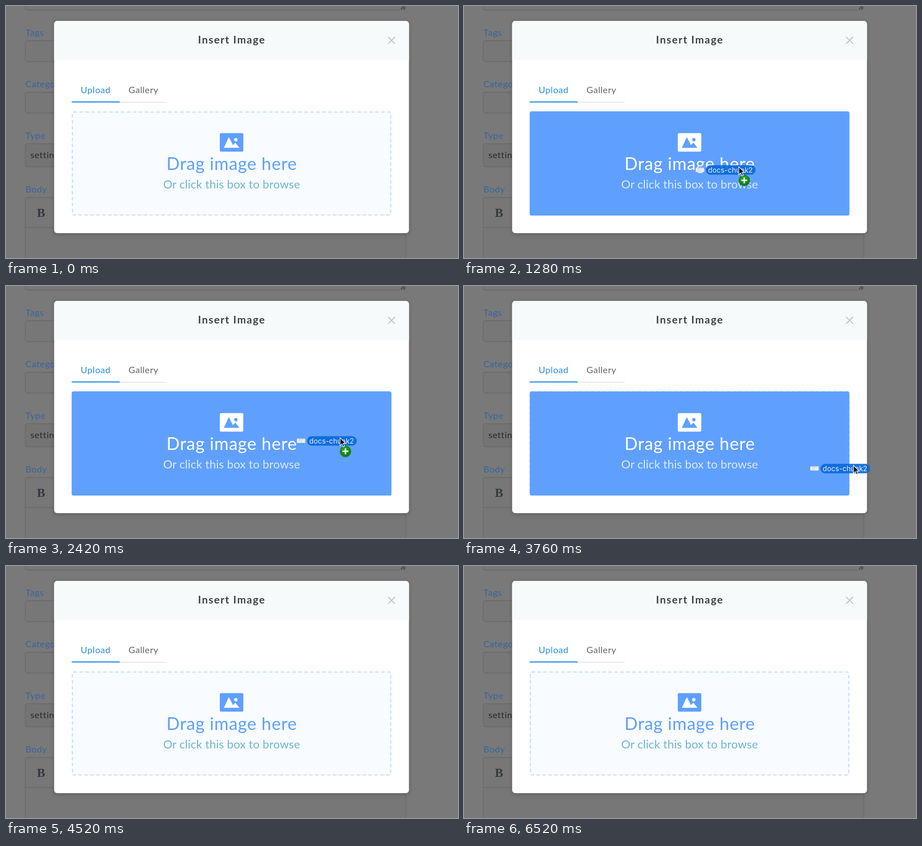
These frames come from a looping animation (1000x558 px, 6540 ms). An HTML page:

```html
<!DOCTYPE html>
<html lang="en">
<head>
<meta charset="utf-8">
<title>Insert Image</title>
<style>
html, body { margin: 0; width: 100%; height: 100%; overflow: hidden; background: #797979; }
svg { display: block; width: 100vw; height: 100vh; }
text { font: 20px Lato, "Open Sans", sans-serif; letter-spacing: .6px; }
.label { fill: #38669b; }
.field { fill: #777; stroke: #686868; stroke-width: 1.3; }
.mid { text-anchor: middle; }
#modal { filter: drop-shadow(0 2px 5px rgba(0, 0, 0, .22)); }
</style>
</head>
<body>
<svg viewBox="0 0 1000 558">
  <defs>
    <radialGradient id="green" cx=".45" cy=".35" r=".7">
      <stop offset="0" stop-color="#32ac26"/>
      <stop offset="1" stop-color="#087510"/>
    </radialGradient>
  </defs>

  <!-- dimmed form -->
  <rect width="1000" height="558" fill="#797979"/>
  <rect class="field" x="42.5" y="-40" width="842" height="49" rx="5"/>
  <path d="M874 7l8-8M879 7l4-4" stroke="#333" stroke-width="1.6"/>
  <text class="label" x="43" y="66">Tags</text>
  <rect class="field" x="42.5" y="77" width="842" height="46" rx="5"/>
  <text class="label" x="43" y="180">Categories</text>
  <rect class="field" x="42.5" y="191" width="842" height="46" rx="5"/>
  <text class="label" x="43" y="294">Type</text>
  <rect class="field" x="42.5" y="305" width="842" height="51" rx="5" style="fill:#747474"/>
  <text x="54" y="337" fill="#2b2b2b">settings</text>
  <text class="label" x="43" y="413">Body</text>
  <rect class="field" x="42.5" y="424" width="842" height="160" rx="4"/>
  <path d="M43 490.5H884" stroke="#686868" stroke-width="1.3"/>
  <text x="68.5" y="467" fill="#35383d" style="font:bold 27px 'Liberation Serif',serif">B</text>

  <!-- dialog -->
  <rect id="modal" x="106.5" y="33" width="785" height="470" rx="7" fill="#fff"/>
  <path d="M106.5 119V40a7 7 0 0 1 7-7H884.5a7 7 0 0 1 7 7V119Z" fill="#f6fafb"/>
  <text class="mid" x="499.5" y="83" fill="#414141" style="font-size:23px;font-weight:bold;letter-spacing:1.9px">Insert Image</text>
  <path d="M845.5 68.5l15 15m0-15l-15 15" stroke="#c2c5c6" stroke-width="2.3"/>
  <text x="165" y="193" fill="#2a8ee2">Upload</text>
  <text x="271" y="193" fill="#666">Gallery</text>
  <path d="M251 213H355" stroke="#dedede" stroke-width="1.3"/>
  <path d="M145.5 212.5H251.5" stroke="#1f8dea" stroke-width="2.6"/>

  <!-- drop zone -->
  <rect id="zone" x="145.5" y="233.5" width="707" height="230.5" rx="4"/>
  <rect id="edge" x="146.8" y="234.8" width="704.4" height="227.9" rx="2.7" fill="none" stroke-width="2.6"/>
  <rect id="pic" x="473" y="281.5" width="52" height="41" rx="3"/>
  <g id="hill">
    <path d="M482 314l10-22q1-1.5 2 0l8 16 5.5-5.5 9 11.5z"/>
    <circle cx="508.5" cy="296" r="3.7"/>
  </g>
  <text id="title" class="mid" x="499.5" y="362.5" style="font-size:38.5px;letter-spacing:.8px">Drag image here</text>
  <text id="sub" class="mid" x="499.2" y="404" style="font-size:25.5px;letter-spacing:.2px">Or click this box to browse</text>

  <!-- dragged file, relative to the pointer tip -->
  <g id="file">
    <rect x="-95.5" y="2" width="18.5" height="9.5" fill="#edf1f6" stroke="#a9b6c8" stroke-width=".8"/>
    <path d="M-93 4.5h13M-92 8h8" stroke="#b9c3d0"/>
    <rect x="-73" y="-3.5" width="110" height="21" rx="10.5" fill="#0c69da" opacity=".92"/>
    <text x="-68" y="13" fill="#e4f0ff" style="font:15.5px Inter,Roboto,sans-serif;letter-spacing:.15px">docs-chunk2</text>
  </g>
  <g id="pointer">
    <g id="badge">
      <circle cx="12" cy="31.5" r="12.5" opacity=".18"/>
      <circle cx="12" cy="30" r="12" fill="url(#green)" stroke="#137516" stroke-width=".8"/>
      <path d="M5.5 30h13M12 23.5v13" stroke="#fff" stroke-width="3"/>
    </g>
    <path d="M0 0V17.5L4.2 13.6 6.9 20.2 9.9 18.9 7.2 12.5H12.5Z" fill="#111" stroke="#fff" stroke-width="1.3"/>
  </g>
</svg>

<script>
const LOOP = 6540, ENTER = 750, LEAVE = 3750, FADE = 300;
const $ = id => document.getElementById(id);

// pointer path: time, x, y
const path = [
  [560, 935, 640], [620, 900, 592], [680, 846, 545], [760, 725, 465],
  [800, 680, 425], [840, 647, 394], [860, 641, 388], [920, 626, 374],
  [1100, 610, 359], [1280, 608, 356], [1400, 612, 355], [1980, 704, 342],
  [2420, 739, 336], [2700, 732, 335], [3280, 732, 336], [3540, 785, 360],
  [3760, 861, 397], [3840, 940, 436], [3960, 1110, 516]
];

const slope = (i, k) => {
  const a = path[Math.max(i - 1, 0)], b = path[Math.min(i + 1, path.length - 1)];
  return (b[k] - a[k]) / (b[0] - a[0]);
};

// Hermite curve through the path points
function at(t) {
  t = Math.min(Math.max(t, path[0][0]), path[path.length - 1][0]);
  let i = 0;
  while (i < path.length - 2 && t > path[i + 1][0]) i++;
  const a = path[i], b = path[i + 1], d = b[0] - a[0], u = (t - a[0]) / d;
  return [1, 2].map(k =>
    a[k] + (b[k] - a[k]) * u * u * (3 - 2 * u) +
    d * u * (1 - u) * ((1 - u) * slope(i, k) - u * slope(i + 1, k)));
}

const smooth = u => (u = Math.min(Math.max(u, 0), 1), u * u * (3 - 2 * u));
const mix = (a, b, u) => `rgb(${a.map((v, i) => v + (b[i] - v) * u)})`;
const place = (id, p) => $(id).setAttribute("transform", `translate(${p})`);
const paint = (id, color) => $(id).setAttribute("fill", color);
const show = (id, on) => $(id).style.display = on ? "" : "none";

const BLUE = [95, 160, 255], WHITE = [255, 255, 255];

function draw() {
  const t = performance.now() % LOOP;
  const hover = smooth((t - ENTER) / FADE) - smooth((t - LEAVE - 10) / FADE);
  const over = t >= ENTER && t < LEAVE;
  const ink = mix(BLUE, WHITE, hover);

  paint("zone", mix([248, 251, 255], BLUE, hover));
  $("edge").setAttribute("stroke", mix([201, 223, 255], BLUE, hover));
  $("edge").setAttribute("stroke-dasharray", over ? "none" : "7.85 5.24");
  paint("pic", ink);
  paint("title", ink);
  paint("hill", mix(WHITE, BLUE, hover));
  paint("sub", mix([108, 181, 214], [217, 234, 255], hover));

  // the file trails the pointer slightly while it rushes in
  place("file", at(t < 1000 ? t - 20 : t));
  place("pointer", at(t));
  show("badge", over);
  const dragging = t > path[0][0] && t < 3960;
  show("file", dragging);
  show("pointer", dragging);
  requestAnimationFrame(draw);
}
draw();
</script>
</body>
</html>
```
